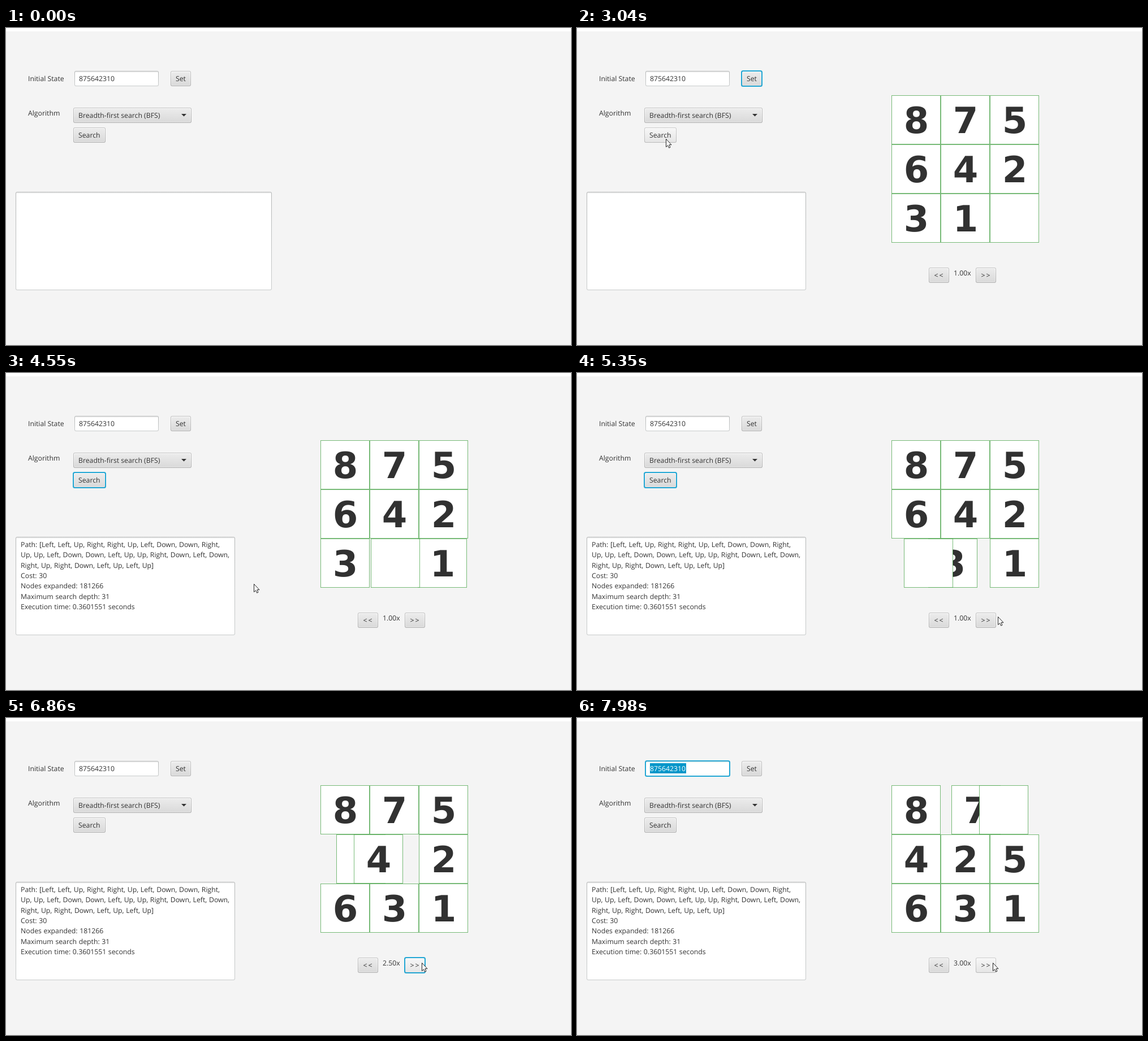
An HTML page that plays this animation: 999x561 px, repeating every 8 s.

```html
<!DOCTYPE html>
<html lang="en">
<head>
<meta charset="utf-8">
<title>Eight puzzle solver</title>
<style>
  html, body { margin: 0; width: 100%; height: 100%; overflow: hidden; background: #fff; }
  svg { display: block; width: 999px; height: 561px; }
  text { font: 12.25px "Open Sans", "Noto Sans", sans-serif; fill: #333; white-space: pre; text-rendering: geometricPrecision; }
  #report text { word-spacing: .5px; }
  .tile rect { fill: #fff; stroke: #008000; stroke-opacity: .52; }
  .tile text { font: bold 64px "DejaVu Sans", sans-serif; text-anchor: middle; fill: #313131; }
  .arrows { letter-spacing: 2px; }
  .ring { fill: none; stroke: #039ed3; stroke-width: 2; stroke-opacity: .85; visibility: hidden; }
  .focus .ring { visibility: visible; }
  .body { fill: url(#normal); }
  .hover .body { fill: url(#hover); }
  .down .body { fill: url(#down); }
  .hover .edge { fill: url(#edgeHover); }
  .edge { fill: url(#edge); }
  .picked { visibility: hidden; fill: #0096c9; }
  .focus .picked { visibility: visible; }
  .focus .value { fill: #fff; }
</style>
</head>
<body>
<svg id="stage" viewBox="0 0 999 561" xmlns="http://www.w3.org/2000/svg"></svg>
<script>
const LOOP = 8000, CELL = 87;
const stage = document.getElementById('stage');
const $ = id => document.getElementById(id);

const gradient = (id, top, bottom) =>
  `<linearGradient id="${id}" x2="0" y2="1"><stop stop-color="${top}"/><stop offset="1" stop-color="${bottom}"/></linearGradient>`;
const box = (cls, x, y, w, h, r, extra = '') =>
  `<rect class="${cls}" x="${x}" y="${y}" width="${w}" height="${h}" rx="${r}" ${extra}/>`;
const label = (x, y, text, extra = '') => `<text x="${x}" y="${y}" ${extra}>${text}</text>`;
const ring = (x, y, w, h) => box('ring', x, y, w, h, 2.5);

const buttons = {
  set: [291, 76, 36, 27],
  algo: [119, 141, 209, 27],
  search: [119, 176, 57, 27],
  slower: [622, 424, 36, 27],
  faster: [705, 424, 36, 27]
};

function button(id, text, dx = 9, extra = '') {
  const [x, y, w, h] = buttons[id];
  return `<g id="${id}">` + box('edge', x, y, w, h, 3) +
    box('', x + 1, y + 1, w - 2, h - 2, 2, 'fill="url(#shine)"') +
    box('body', x + 2, y + 2, w - 4, h - 4, 1.5) +
    ring(x, y, w, h) + label(x + dx, y + 18, text, extra) + '</g>';
}

const input = (id, x, y, w, h) =>
  box('', x, y, w, h, 3, `id="${id}Edge" fill="url(#inputEdge)"`) +
  box('', x + 1, y + 1, w - 2, h - 2, 2, `id="${id}Fill" fill="#fff"`) +
  box('', x + 2, y + 1, w - 4, 2, 0, `id="${id}Shade" fill="#f1f1f1"`);

const report = [
  'Path: [Left, Left, Up, Right, Right, Up, Left, Down, Down, Right,',
  'Up, Up, Left, Down, Down, Left, Up, Up, Right, Down, Left, Down,',
  'Right, Up, Right, Down, Left, Up, Left, Up]',
  'Cost: 30',
  'Nodes expanded: 181266',
  'Maximum search depth: 31',
  'Execution time: 0.3601551 seconds'
];
const slots = [...Array(9).keys()];

stage.innerHTML = '<defs>' +
  gradient('normal', '#ebebeb', '#dadada') + gradient('hover', '#f6f6f6', '#e6e6e6') +
  gradient('down', '#dfdfdf', '#d2d2d2') + gradient('shine', '#fcfcfc', '#e4e4e4') +
  gradient('edge', '#c2c2c2', '#afafaf') + gradient('edgeHover', '#cbcbcb', '#bababa') +
  gradient('inputEdge', '#b4b6b6', '#c9cccc') + '</defs>' +
  box('', 0, 6, 999, 555, 0, 'fill="#f4f4f4"') +
  label(39, 94, 'Initial State') + label(39, 155, 'Algorithm') +
  '<g id="field">' + input('state', 121, 76, 149, 27) + ring(121, 76, 149, 27) +
  box('picked', 129, 80, 64, 18, 0) + label(129, 94, '875642310', 'class="value"') + '</g>' +
  button('set', 'Set') + button('algo', 'Breadth-first search (BFS)') +
  '<path d="M310 152h9l-4.5 4.5z" fill="#333"/>' +
  button('search', 'Search') + input('area', 17, 290, 453, 174) +
  '<g id="report">' + report.map((line, i) => label(26, 308 + i * 18.3, line)).join('') + '</g>' +
  '<g id="board">' +
  slots.map(i => `<g class="tile" id="tile${i}"><rect width="${CELL - 1}" height="${CELL - 1}"/>` +
    `<text x="${CELL / 2}" y="66.8"></text></g>`).join('') +
  button('slower', '&lt;&lt;', 9.5, 'class="arrows"') +
  label(666, 438, '1.00x', 'id="speed"') +
  button('faster', '&gt;&gt;', 9.5, 'class="arrows"') + '</g>' +
  '<circle id="glow" r="13" fill="#ff0" fill-opacity=".62"/>' +
  '<path id="cursor" d="M.5 .5V14.6L3.6 11.7 5.6 16.2 7.9 15.2 5.9 10.7H10Z" fill="#fff" stroke="#222" stroke-linejoin="round"/>';

// time, x, y
const pointer = [
  [130, 900, 548], [500, 600, 320], [760, 420, 195], [920, 342, 139], [1130, 318, 107], [1320, 309, 95],
  [2120, 309, 95], [2400, 240, 140], [2720, 157, 196], [3610, 157, 196], [4070, 272, 270],
  [4470, 411, 357], [4550, 438, 373], [4950, 610, 418], [5350, 744, 431], [5430, 744, 431], [5580, 735, 433]
];
// press, release
const clicks = [
  [1780, 1940], [3120, 3270], [5600, 5690], [5940, 6050], [6150, 6250],
  [6350, 6450], [6550, 6650], [6790, 6850], [6970, 7050], [7210, 7290]
];
const focus = [
  [0, ''], [1780, 'set'], [3120, 'search'], [5600, 'faster'], [5660, 'field'], [5940, 'faster'],
  [6690, 'field'], [6790, 'faster'], [7146, 'field'], [7210, 'faster'], [7524, 'field']
];
// start, step of the empty cell, speed
const moves = [
  [3630, -1, 1], [4650, -1, 1], [5672, -3, 1], [6702, 1, 2.25],
  [7160, 1, 2.75], [7540, -3, 3], [7888, -1, 3]
];

// Gentle start and stop over a fifth of the time each.
function easeBoth(u) {
  if (u < .2) return 3.125 * u * u;
  if (u > .8) return 1 - 3.125 * (1 - u) ** 2;
  return 1.25 * u - .125;
}

function pointerAt(t) {
  const i = pointer.findIndex(p => p[0] > t);
  if (i < 1) return pointer[i < 0 ? pointer.length - 1 : 0].slice(1);
  const [t0, x0, y0] = pointer[i - 1], [t1, x1, y1] = pointer[i];
  const u = (t - t0) / (t1 - t0);
  return [x0 + (x1 - x0) * u, y0 + (y1 - y0) * u].map(Math.round);
}

function drawBoard(t) {
  const cells = [8, 7, 5, 6, 4, 2, 3, 1, 0];
  const shift = Array(9).fill(0);
  let step = 0;
  for (const [start, d, rate] of moves) {
    if (t < start) break;
    const from = cells.indexOf(0), to = from + d;
    const u = (t - start) * rate / 1000;
    if (u >= 1) {
      [cells[from], cells[to]] = [cells[to], cells[from]];
    } else {
      step = d;
      shift[from] = easeBoth(u) * CELL;
      shift[to] = -shift[from];
    }
  }
  const dx = Math.abs(step) === 1 ? step : 0, dy = dx ? 0 : step / 3;
  slots.forEach(i => {
    const tile = $('tile' + i);
    const x = 556.5 + i % 3 * CELL + Math.round(shift[i] * dx);
    const y = 119.5 + Math.floor(i / 3) * CELL + Math.round(shift[i] * dy);
    tile.setAttribute('transform', `translate(${x} ${y})`);
    tile.lastChild.textContent = cells[i] || '';
  });
}

const show = (id, on) => $(id).setAttribute('visibility', on ? 'visible' : 'hidden');

function draw(t) {
  const [x, y] = pointerAt(t);
  const pressed = clicks.some(([a, b]) => t >= a && t < b);
  const focused = focus.filter(f => f[0] <= t).pop()[1];
  const ready = t >= 1940;

  for (const id in buttons) {
    const [bx, by, w, h] = buttons[id];
    const over = t >= 130 && x >= bx && x < bx + w && y >= by && y < by + h;
    const list = $(id).classList;
    list.toggle('hover', over);
    list.toggle('down', over && pressed);
    list.toggle('focus', focused === id);
  }
  $('field').classList.toggle('focus', focused === 'field');

  const areaWidth = ready ? 388 : 453;
  $('areaEdge').setAttribute('width', areaWidth);
  $('areaFill').setAttribute('width', areaWidth - 2);
  $('areaShade').setAttribute('width', areaWidth - 4);

  $('board').style.display = ready ? '' : 'none';
  drawBoard(t);
  show('report', t >= 3640);
  const raised = clicks.slice(2).filter(c => c[1] <= t).length;
  $('speed').textContent = (1 + raised * .25).toFixed(2) + 'x';

  show('cursor', t >= 130);
  show('glow', pressed);
  for (const id of ['cursor', 'glow']) $(id).setAttribute('transform', `translate(${x} ${y})`);
}

const begin = performance.now();
function tick() {
  draw((performance.now() - begin) % LOOP);
  requestAnimationFrame(tick);
}
tick();
</script>
</body>
</html>
```
